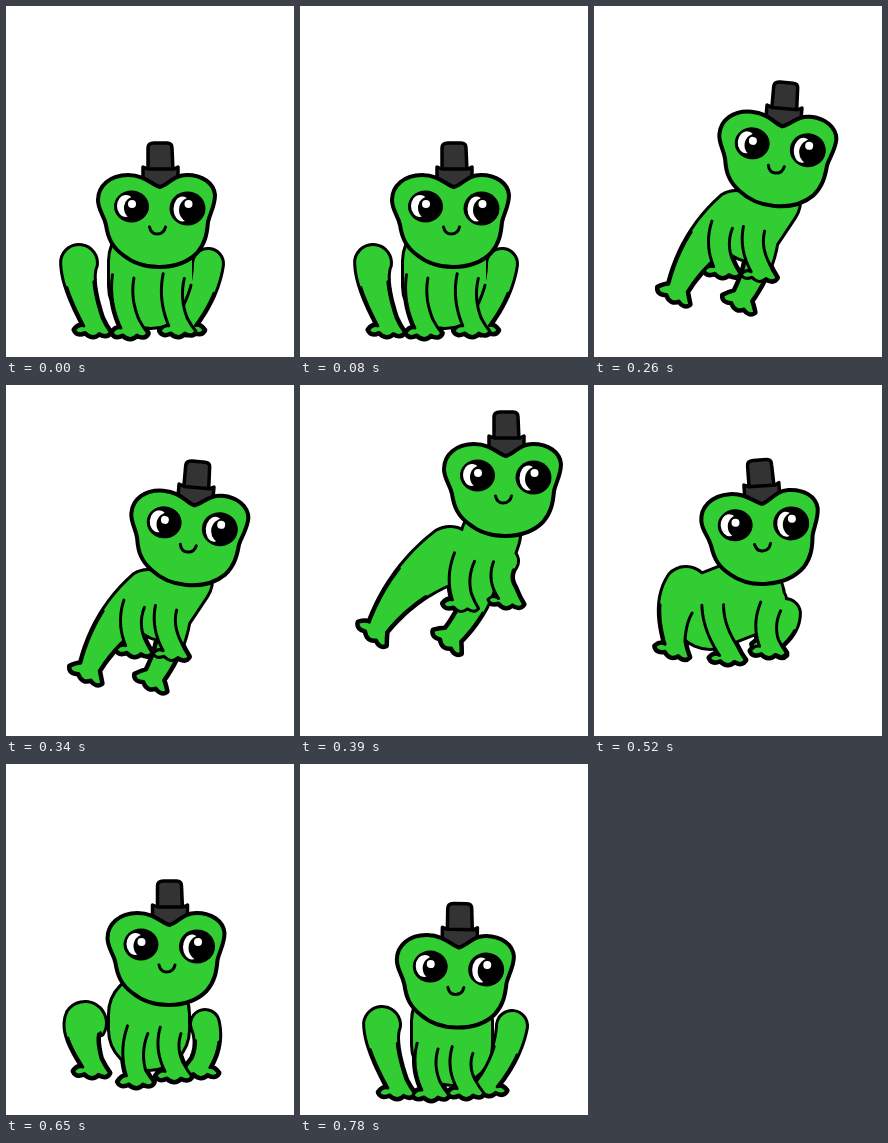
Recreate the animation shown at these times as an HTML page. Size 288 px wide and 351 px high, loop 0.91 s.

```html
<!DOCTYPE html>
<html lang="en">
<head>
<meta charset="utf-8">
<title>Jumping frog</title>
<style>
  html, body { margin: 0; width: 100%; height: 100%; overflow: hidden; background: #fff; }
  svg { display: block; width: 288px; height: 351px; overflow: hidden; }
  path { stroke: #000; stroke-linecap: round; stroke-linejoin: round; }
  .edge { stroke-width: 6; }
  .skin { fill: #32cd32; stroke: none; }
  .line { fill: none; stroke-width: 3; }
  .face { fill: #32cd32; stroke-width: 4; }
  .hat { fill: #333; stroke-width: 3.5; }
  .white { fill: #fff; }
  #strip { animation: hop 910ms steps(7) infinite; }
  @keyframes hop { to { transform: translateX(-2016px); } }
</style>
</head>
<body>
<svg viewBox="0 0 288 351">
  <defs>
    <clipPath id="left"><ellipse cx="125.5" cy="200.5" rx="17.5" ry="16"/></clipPath>
    <clipPath id="right"><ellipse cx="181.500" cy="202.500" rx="18" ry="17"/></clipPath>
    <g id="head">
      <path class="hat" d="M142 165V142Q142 137 148 137H161Q166 137 166 142L167 165Z"/>
      <path class="hat" d="M137 161L142 163H168L172 161V176L154 188L137 176Z"/>
      <path class="face" d="M154 181C146 179 139 169 122 169C104 169 92 180 92 194C92 204 98 209 100 219C102 232 106 241 117 249C128 258 140 261 153 261C168 261 182 256 191 247C199 238 201 228 202 216C204 207 209 200 209 189C208 177 196 169 181 169C168 169 163 178 154 181Z"/>
      <g clip-path="url(#left)">
        <circle cx="125.500" cy="200.500" r="18"/>
        <ellipse class="white" cx="120" cy="200" rx="9" ry="11"/>
        <circle cx="130" cy="202" r="12"/>
        <circle class="white" cx="126" cy="198" r="4"/>
      </g>
      <g clip-path="url(#right)">
        <circle cx="181.500" cy="202.500" r="19"/>
        <ellipse class="white" cx="176.500" cy="203" rx="9" ry="12.500"/>
        <circle cx="186" cy="204" r="13"/>
        <circle class="white" cx="182.500" cy="198" r="4"/>
      </g>
      <path class="line" d="M143.500 221Q145 228 151 228Q158 228 159.500 221"/>
    </g>
  </defs>
  <g id="strip"></g>
</svg>
<script>
// head: x, y, angle; torso: two ends and width; tilt: angle of the hind feet
// hind and fore legs: top, ankle (and thigh width)
const poses = [
  { head: [0, 0, 0], tilt: 4, torso: [145, 255, 145, 280, 82],
    hind: [[73, 257, 87, 316, 34], [202, 258, 181, 314, 28]], fore: [[119, 262, 124, 318], [170, 262, 172, 316]] },
  { head: [20.5, -17.5, 8], tilt: 14, torso: [160, 245, 122, 260, 60],
    hind: [[94, 246, 82, 307, 46], [194, 269, 174, 308, 27]], fore: [[122, 252, 115, 297], [160, 258, 147, 303]] },
  { head: [31.5, -61, 5], tilt: 28, torso: [176, 195, 156, 225, 58],
    hind: [[142, 211, 84, 282, 50], [168, 232, 149, 290, 30]], fore: [[131, 212, 129, 257], [162, 216, 166, 261]] },
  { head: [52, -110, 0], tilt: 40, torso: [191, 150, 181, 180, 56],
    hind: [[150, 170, 78, 242, 54], [180, 200, 153, 250, 28]], fore: [[168, 165, 162, 212], [206, 176, 207, 208]] },
  { head: [16.5, -62, -4], tilt: 18, torso: [152, 212, 116, 226, 74],
    hind: [[92, 205, 81, 258, 44], [191, 229, 178, 256, 28]], fore: [[119, 212, 134, 265], [180, 215, 175, 258]] },
  { head: [9.5, -20, 0], tilt: 3, torso: [143, 250, 143, 266, 78],
    hind: [[79, 259, 86, 299, 40], [199, 260, 195, 299, 26]], fore: [[135, 258, 130, 309], [167, 260, 168, 303]] },
  { head: [4.5, 2.5, 1], tilt: 2, torso: [152, 257, 152, 281, 78],
    hind: [[82, 261, 97, 320, 34], [212, 262, 189, 317, 28]], fore: [[130, 275, 131, 322], [165, 280, 166, 320]] }
];

const ANKLE = 20;
const BOWS = { hind: [[-10, -10], [8, 0]], fore: [[-10, 0], [-10, 0]] };
const TOES = [[[-14, 3], [-18, 9]], [[-15, 15], [-7, 11]], [[1, 18], [7, 11]], [[15, 15], [18, 9]]];

// Tapered leg along a bowed spine, ending in a webbed foot
function leg([x0, y0, x1, y1, w = 22], [bowX, bowY], tilt) {
  const cx = (x0 + x1) / 2 + bowX, cy = (y0 + y1) / 2 + bowY;
  const at = (t, side) => {
    const u = 1 - t;
    const dx = u * (cx - x0) + t * (x1 - cx), dy = u * (cy - y0) + t * (y1 - cy);
    const r = side * (u * w + t * ANKLE) / 2 / Math.hypot(dx, dy);
    return [u * u * x0 + 2 * u * t * cx + t * t * x1 - dy * r,
            u * u * y0 + 2 * u * t * cy + t * t * y1 + dx * r];
  };
  const a = tilt * Math.PI / 180, cos = Math.cos(a), sin = Math.sin(a);
  const turn = ([x, y]) => [x1 + x * cos - y * sin, y1 + x * sin + y * cos];
  const outline = start => {
    const ts = Array.from({ length: 13 }, (_, i) => start + (1 - start) * i / 12);
    const foot = TOES.map(([c, p]) => `Q${turn(c)} ${turn(p)}`).join("");
    return `M${ts.map(t => at(t, 1)).join("L")}${foot}Q${turn([13, 3])} ` +
      ts.reverse().map(t => at(t, -1)).join("L");
  };
  return { shape: `${outline(0)}A${w / 2} ${w / 2} 0 0 0 ${at(0, 1)}Z`, crease: outline };
}

function capsule([x0, y0, x1, y1, w]) {
  const r = w / 2, len = Math.hypot(x1 - x0, y1 - y0);
  const nx = -(y1 - y0) / len * r, ny = (x1 - x0) / len * r;
  return `M${x0 + nx} ${y0 + ny}L${x1 + nx} ${y1 + ny}A${r} ${r} 0 0 0 ${x1 - nx} ${y1 - ny}` +
    `L${x0 - nx} ${y0 - ny}A${r} ${r} 0 0 0 ${x0 + nx} ${y0 + ny}Z`;
}

const path = (cls, d) => `<path class="${cls}" d="${d}"/>`;

function frog({ head: [x, y, angle], tilt, torso, hind, fore }, i) {
  const back = hind.map((l, k) => leg(l, BOWS.hind[k], tilt));
  const front = fore.map((l, k) => leg(l, BOWS.fore[k], tilt / 5));
  const body = [capsule(torso), ...[...back, ...front].map(l => l.shape)].join("");
  return `<g transform="translate(${i * 288} 0)">` +
    path("edge", body) + path("skin", body) +
    back.map(l => path("line", l.crease(0.45))).join("") +
    front.map(l => path("skin", l.shape) + path("line", l.crease(0.15))).join("") +
    `<use href="#head" transform="translate(${x} ${y}) rotate(${angle} 151 213)"/></g>`;
}

document.getElementById("strip").innerHTML = poses.map(frog).join("");
</script>
</body>
</html>
```
